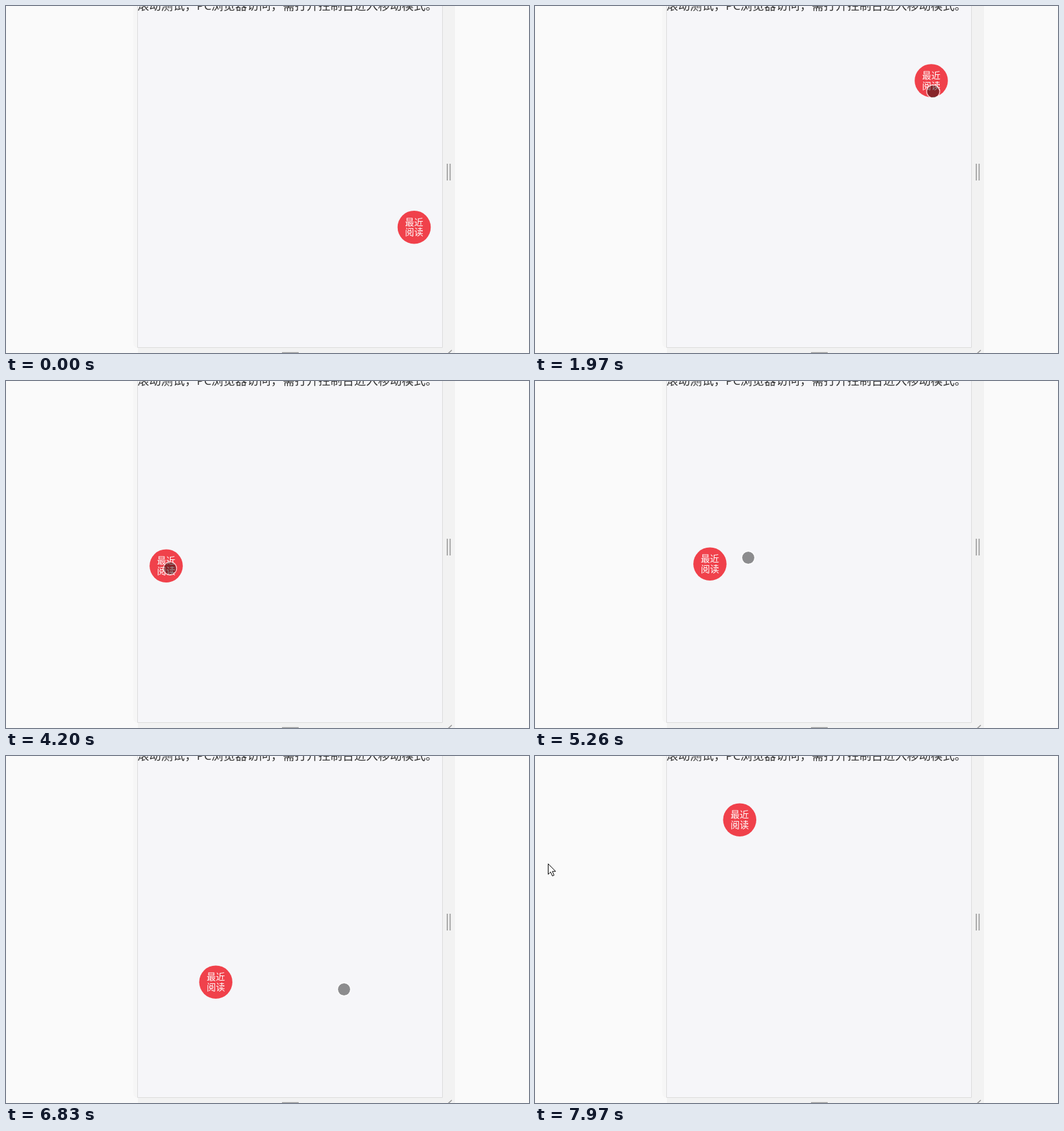
Write an HTML page that moves like this. It is 813 px wide and 539 px high and loops after 8 s.

```html
<!DOCTYPE html>
<html lang="zh-CN">
<head>
<meta charset="utf-8">
<style>
  html, body { margin: 0; width: 100%; height: 100%; overflow: hidden; background: #fafafa; }
  svg { display: block; }
  text { font-family: "Open Sans", "Noto Sans CJK SC", "Noto Sans CJK", sans-serif; }
</style>
</head>
<body>
<svg width="813" height="539" viewBox="0 0 813 539">
  <path d="M198 0H205V531Q198 531 198 522Z" fill="#f6f6f6"/>
  <path d="M205 0H698V539H205Z" fill="#f2f2f2"/>
  <path d="M204.5 -1H678.5V530.5H204.5Z" fill="#f6f6f9" stroke="#dcdcdc"/>
  <path d="M686 245V271M690.4 245V271" stroke="#999" stroke-width="1.6"/>
  <path d="M429 538.5H455M687 540L693 534.5" stroke="#999" stroke-width="1.6"/>
  <text x="204" y="6" font-size="18.5" fill="#333">滚动测试，PC浏览器访问，需打开控制台进入移动模式。</text>
  <g id="button">
    <circle cy=".2" r="25.8" fill="#f0414b"/>
    <g font-size="14.2" font-weight="500" fill="#fff" text-anchor="middle">
      <text y="-3">最近</text>
      <text y="12.9">阅读</text>
    </g>
  </g>
  <g id="touch">
    <circle r="9.5" fill="#000" fill-opacity=".43"/>
    <circle r="10.2" fill="none" stroke="#fff" stroke-width="1.4" stroke-opacity=".65"/>
  </g>
  <path id="arrow" d="M.5 .5V16.8L4.3 13.2L7 19.3L9.6 18.2L7 12.2H12Z" fill="#fff" stroke="#000"/>
</svg>
<script>
const LOOP = 8000, STEP = 140, SNAP = 600, DOCK = 249;
const MARKS = [310, 1970, 3080, 4200, 5260, 6830, 7970];
const [button, touch, arrow] = ["button", "touch", "arrow"].map(id => document.getElementById(id));

// The button is dragged along path, then slides to the dock;
// the released pointer passes rest [time, x, y] on its way to the next grab.
const gestures = [
  { grab: 0, release: 0, dock: 634.5, hold: [0, 0], rest: [310, 7, 200], path: [[634.5, 343.5]] },
  { grab: 642, release: 2855, hold: [3, 17], rest: [3080, 508.5, 284.5],
    path: [[634.5, 343.5], [590, 48], [610, 297], [616, 115.7], [579, 228], [540, 287]] },
  { grab: 4200, release: 4759, hold: [6, 4], rest: [5260, 331.5, 274.5],
    path: [[249, 287], [218, 289], [330, 270], [388, 284]] },
  { grab: 5560, release: 6408, hold: [16, 12], rest: [6830, 525.5, 362.5],
    path: [[249, 284], [480, 345], [509, 351]] },
  { grab: 7300, release: 7645, hold: [16, 12], rest: [7970, 20, 167],
    path: [[249, 351], [340, 140], [400, 99]] }
];

const mix = (p, q, k) => p.map((v, i) => v + (q[i] - v) * k);
const add = (p, q) => p.map((v, i) => v + q[i]);
const progress = (t, a, b) => Math.max(0, Math.min(1, (t - a) / (b - a)));

function along(path, k) {
  const pos = k * (path.length - 1), i = Math.floor(pos);
  return mix(path[i], path[i + 1] ?? path[i], pos - i);
}

// The screen refreshes in even steps between the marks
function refreshTime(t) {
  const i = MARKS.findLastIndex(m => m <= t);
  if (i < 0) return 0;
  const start = MARKS[i], span = (MARKS[i + 1] ?? LOOP) - start;
  const step = span / Math.max(1, Math.round(span / STEP));
  return start + Math.floor((t - start) / step) * step;
}

function buttonAt(t, { grab, release, path, dock = DOCK }) {
  if (t < release) return along(path, (t - grab) / (release - grab));
  const end = path.at(-1);
  return mix(end, [dock, end[1]], progress(t, release, release + SNAP));
}

function pointerAt(t, g, next) {
  if (t < g.release) return add(buttonAt(t, g), g.hold);
  const [time, ...rest] = g.rest;
  if (t < time) return mix(add(g.path.at(-1), g.hold), rest, progress(t, g.release, time));
  return next ? mix(rest, add(next.path[0], next.hold), progress(t, time, next.grab) ** 2) : rest;
}

const place = (el, [x, y]) => el.setAttribute("transform", `translate(${x} ${y})`);
const show = (el, on) => el.setAttribute("visibility", on ? "visible" : "hidden");

function draw(now) {
  const t = refreshTime(now % LOOP);
  const i = gestures.findLastIndex(g => g.grab <= t);
  const pointer = pointerAt(t, gestures[i], gestures[i + 1]);
  const inside = pointer[0] > 195 && pointer[0] < 678;
  place(button, buttonAt(t, gestures[i]));
  place(touch, pointer);
  place(arrow, pointer);
  show(touch, t >= MARKS[0] && inside);
  show(arrow, t >= MARKS[0] && !inside);
  requestAnimationFrame(draw);
}
requestAnimationFrame(draw);
</script>
</body>
</html>
```
